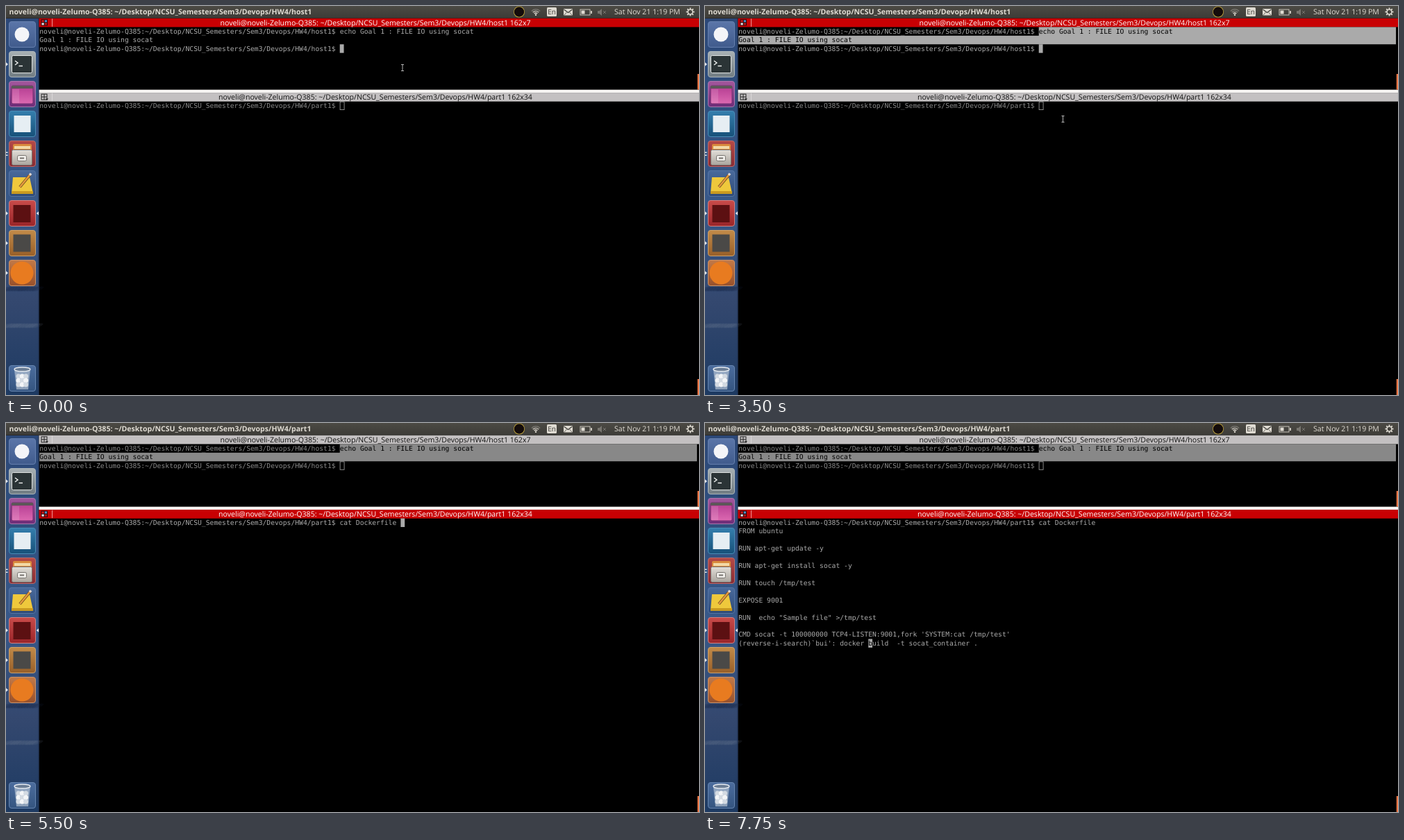
An HTML page with a canvas for the animation above (8 s loop, 998 px wide and 561 px high).

```html
<!DOCTYPE html>
<html lang="en">
<head>
<meta charset="utf-8">
<title>Terminal session</title>
<style>
html, body { margin: 0; width: 100%; height: 100%; overflow: hidden; background: #000; }
canvas { display: block; width: 998px; height: 561px; }
</style>
</head>
<body>
<canvas id="stage" width="998" height="561"></canvas>
<script>
const ctx = document.getElementById('stage').getContext('2d');
const LOOP = 8000, W = 998, H = 561;
const LEFT = 48.2, CW = 998 / 1366 * 8, RH = 998 / 1366 * 17;
const TOP1 = 30.4, TOP2 = 137.6;
const MONO = '9.71px "DejaVu Sans Mono", monospace';
const UI = '10.58px "Open Sans", sans-serif';
const USER = 'noveli@noveli-Zelumo-Q385:';
const DIR = '~/Desktop/NCSU_Semesters/Sem3/Devops/HW4/';
const PROMPT = dir => USER + DIR + dir + '$ ';
const COL = PROMPT('host1').length;

const DOCKERFILE = [
  'FROM ubuntu', '',
  'RUN apt-get update -y', '',
  'RUN apt-get install socat -y', '',
  'RUN touch /tmp/test', '',
  'EXPOSE 9001', '',
  'RUN  echo "Sample file" >/tmp/test', '',
  "CMD socat -t 100000000 TCP4-LISTEN:9001,fork 'SYSTEM:cat /tmp/test'"
];
const FOUND = 'docker build  -t socat_container .';

// Timelines: [start in ms, value]
const POINTER = [
  [0, [571, 89]], [250, [487.5, 69]], [500, [461.5, 52]], [750, [489.5, 41]],
  [1000, [484, 38.5]], [1750, [483, 46]], [2000, [483, 50]],
  [2750, [536, 196]], [3000, [536.5, 202]], [3250, [514.5, 162]],
  [3500, [515.5, 163]], [4250, null]
];
const BLINK = [[0, 1], [500, 0], [1000, 1], [1750, 0], [2250, 1], [2750, 0], [3500, 1], [6500, 0], [7000, 1]];
const SELECTED = [[0, 0], [1250, 1], [1750, 2]];
const TYPED = [[0, ''], [4250, 'c'], [4500, 'cat'], [4750, 'cat '], [5250, 'cat Do'], [5500, 'cat Dockerfile ']];
const QUERY = [[0, null], [7000, ''], [7500, 'bu'], [7750, 'bui']];

function at(line, t) {
  let value;
  for (const [start, v] of line) if (t >= start) value = v;
  return value;
}

function rect(x, y, w, h, fill) {
  ctx.fillStyle = fill;
  ctx.fillRect(x, y, w, h);
}

function frame(x, y, w, h, color, width = 1) {
  ctx.strokeStyle = color;
  ctx.lineWidth = width;
  ctx.strokeRect(x, y, w, h);
}

function round(x, y, w, h, r, fill, stroke) {
  ctx.beginPath();
  ctx.roundRect(x, y, w, h, r);
  ctx.fillStyle = fill;
  ctx.fill();
  if (stroke) {
    ctx.strokeStyle = stroke;
    ctx.lineWidth = 1;
    ctx.stroke();
  }
}

function disc(x, y, r, fill) {
  ctx.beginPath();
  ctx.arc(x, y, r, 0, Math.PI * 2);
  ctx.fillStyle = fill;
  ctx.fill();
}

function poly(points, fill) {
  ctx.beginPath();
  points.forEach(([x, y]) => ctx.lineTo(x, y));
  ctx.closePath();
  ctx.fillStyle = fill;
  ctx.fill();
}

function stroke(points, color, width = 1) {
  ctx.beginPath();
  points.forEach(([x, y]) => ctx.lineTo(x, y));
  ctx.strokeStyle = color;
  ctx.lineWidth = width;
  ctx.stroke();
}

function fade(y0, y1, ...colors) {
  const g = ctx.createLinearGradient(0, y0, 0, y1);
  colors.forEach((c, i) => g.addColorStop(i / (colors.length - 1), c));
  return g;
}

function label(str, x, y, color, font = UI, align = 'left') {
  ctx.font = font;
  ctx.textAlign = align;
  ctx.fillStyle = color;
  ctx.fillText(str, x, y);
}

const cellX = col => LEFT + col * CW;

function type(str, col, y, color) {
  label(str, cellX(col), y + 9.4, color, MONO);
}

function cursor(col, y, active, on) {
  if (!active) frame(cellX(col) + 0.4, y + 0.6, CW + 0.1, RH - 1, '#aaa', 0.8);
  else if (on) rect(cellX(col), y, CW, RH, '#aaa');
}

function drawPanel(t, dir) {
  rect(0, 0, W, 18, fade(0, 18, '#4c4a44', '#3c3b37'));
  rect(0, 17, W, 1, '#2a2926');
  label(USER + ' ' + DIR + dir, 4.5, 12.3, '#dfdbd2', 'bold 10.56px "Open Sans", sans-serif');

  disc(739, 8.5, 8, '#c5a83b');
  disc(739, 8.5, 7.2, '#140c0b');

  // Network strength
  const weak = t >= 3250 && t < 5000;
  [[8.2, '#77756f'], [5.6, weak ? '#88857f' : '#c4c0b8'], [3, '#dfdbd2']].forEach(([r, c]) => {
    ctx.beginPath();
    ctx.arc(763, 13, r, -Math.PI * 0.77, -Math.PI * 0.23);
    ctx.strokeStyle = c;
    ctx.lineWidth = 1.4;
    ctx.stroke();
  });
  disc(763, 12.7, 1.2, '#dfdbd2');

  round(779, 2, 14, 13, 1.5, '#dfdbd2');
  label('En', 786, 12.4, '#3c3b37', '10px "Open Sans", sans-serif', 'center');

  round(803, 4, 13, 9.5, 1, '#dfdbd2');
  stroke([[803.5, 5], [809.5, 9.5], [815.5, 5]], '#3c3b37', 1.1);
  stroke([[804, 13], [807.5, 9]], '#3c3b37', 0.7);
  stroke([[815, 13], [811.5, 9]], '#3c3b37', 0.7);

  frame(827, 5, 14, 8, '#c9c5bc');
  rect(842, 7, 2, 4, '#c9c5bc');
  rect(828.5, 6.5, 5, 5, '#dfdbd2');

  poly([[852, 7], [854.5, 7], [858, 4], [858, 14], [854.5, 11], [852, 11]], '#77756f');
  stroke([[860, 7], [864, 11]], '#77756f');
  stroke([[864, 7], [860, 11]], '#77756f');

  label('Sat Nov 21 1:19 PM', 876, 12.3, '#dfdbd2');

  for (let i = 0; i < 8; i++) {
    const a = i * Math.PI / 4, c = Math.cos(a), s = Math.sin(a);
    stroke([[985.5 + c * 3.6, 8.5 + s * 3.6], [985.5 + c * 6, 8.5 + s * 6]], '#dfdbd2', 1.8);
  }
  ctx.beginPath();
  ctx.arc(985.5, 8.5, 3.4, 0, Math.PI * 2);
  ctx.strokeStyle = '#dfdbd2';
  ctx.lineWidth = 1.5;
  ctx.stroke();
}

function tile(y, light, dark, edge) {
  round(4.5, y - 18.5, 38, 37, 3.5, fade(y - 19, y + 19, light, dark), edge);
}

function pip(y, right) {
  poly(right ? [[47, y - 2.7], [47, y + 2.7], [43.8, y]] : [[0, y - 2.7], [0, y + 2.7], [3, y]], '#e4e8ee');
}

function drawLauncher() {
  rect(0, 18, 47.5, H - 18, fade(18, H, '#2c4878', '#30507f', '#38598a', '#34486f', '#1d3a62'));
  // Soft cloudy wallpaper showing through
  for (let i = 0; i < 26; i++) {
    const x = (i * 37) % 48, y = 408 + (i * 53) % 106;
    ctx.beginPath();
    ctx.ellipse(x, y, 9, 2.5, -0.3, 0, Math.PI * 2);
    ctx.fillStyle = i % 2 ? 'rgba(105,120,150,.13)' : 'rgba(20,32,60,.16)';
    ctx.fill();
  }
  rect(46.5, 18, 1, H - 18, '#20304e');

  tile(41, '#5b76a9', '#405b8c', '#6680ae');
  disc(23, 41, 10.5, '#f4f5f8');

  tile(84, '#a9b1b4', '#717c82', '#aab4ba');
  round(8.5, 71.5, 29, 25, 2, '#2b3436', '#e0e3e2');
  stroke([[13, 79], [17, 82], [13, 85]], '#f2f4f3', 1.4);
  stroke([[18.5, 86.5], [24, 86.5]], '#f2f4f3', 1.4);

  tile(127, '#a4589d', '#6d2c78', '#a878ad');
  round(8, 115, 31, 26, 2, fade(115, 141, '#b43b91', '#dc69b1'), '#6f2b6c');
  rect(8, 115, 31, 4, '#5d5759');
  rect(9, 120, 10, 20, 'rgba(255,255,255,.13)');

  tile(170, '#357fae', '#175078', '#4b8db7');
  rect(11.5, 158, 24, 24, '#e6eef3');

  tile(213, '#b64a48', '#862a32', '#b96c6c');
  round(10, 199, 27, 12, 2, '#d98a3d');
  rect(12, 202, 23, 4, '#f2d9a6');
  round(8.5, 207.5, 29, 22, 2, fade(207, 230, '#e3e0da', '#a9a49d'), '#77716d');
  round(16.5, 215.5, 13, 8, 2, '#eeece8', '#77736e');
  rect(20, 218.5, 6, 2, '#77736e');

  tile(256, '#496a9c', '#2e4a77', '#5675a4');
  poly([[10, 247], [34, 247], [39, 270], [8, 270]], '#efc83c');
  rect(8, 267, 31, 4, '#c99a20');
  stroke([[20, 261], [35, 243]], '#6c4b24', 4);
  stroke([[20, 261], [34, 244]], '#e69a3d', 2.5);
  stroke([[34, 244], [36, 241.5]], '#ddd5d2', 3.5);

  tile(299, '#c94b4a', '#9a2529', '#d08080');
  rect(10.5, 287, 25, 25, '#5c1012');

  tile(342, '#c28b49', '#985f28', '#caa06c');
  rect(10.5, 329.5, 25, 25, '#4a4947');

  tile(385, '#c37a48', '#97502b', '#cb9268');
  disc(23, 385, 16.5, '#e87b20');

  tile(537, '#4c6d9e', '#34547f', '#6685af');
  poly([[12, 524], [35, 524], [32, 553], [15, 553]], 'rgba(212,221,230,.55)');
  ctx.beginPath();
  ctx.ellipse(23.5, 524, 11.5, 3, 0, 0, Math.PI * 2);
  ctx.fillStyle = '#6c7e95';
  ctx.fill();
  ctx.strokeStyle = '#e5eaf0';
  ctx.lineWidth = 1.4;
  ctx.stroke();
  for (let i = 0; i < 9; i++) {
    disc(18 + (i % 3) * 5.3, 534 + Math.floor(i / 3) * 6, 3.5, i % 2 ? '#f3f5f7' : '#d3dae2');
  }

  [84, 211, 215, 299, 342, 385].forEach(y => {
    if (y === 211 || y === 215) rect(0, y - 0.5, 2.6, 1.5, '#e4e8ee');
    else pip(y);
  });
  pip(299, true);
}

function drawTitle(y, text, active) {
  rect(47.5, y, W - 47.5, 12.6, active ? '#c80003' : '#c3c0c1');
  if (active) {
    rect(50.5, y + 1.5, 9.5, 9, '#25090b');
    rect(51.5, y + 2.5, 3.2, 3, '#d51a1c');
    rect(55.8, y + 2.5, 3.2, 3, '#4f8ec9');
    rect(51.5, y + 6.6, 3.2, 3, '#e8e8ee');
    rect(55.8, y + 6.6, 3.2, 3, '#bd1719');
  } else {
    frame(51, y + 2, 8, 8, '#222');
    stroke([[55, y + 2], [55, y + 10]], '#222');
    stroke([[51, y + 6], [59, y + 6]], '#222');
    poly([[57, y + 8.5], [61, y + 8.5], [59, y + 11]], '#222');
  }
  rect(66, y + 0.5, 1, 11.5, active ? '#e99' : '#d9d6d7');
  label(text, 532, y + 9.8, active ? '#fff' : '#111', UI, 'center');
}

function drawTop(t, active, on) {
  drawTitle(17.8, USER + ' ' + DIR + 'host1 162x7', active);
  const ink = active ? '#aaa' : '#888';
  const echo = 'echo Goal 1 : FILE IO using socat';
  const result = 'Goal 1 : FILE IO using socat';
  const sel = at(SELECTED, t);
  type(PROMPT('host1'), 0, TOP1, ink);
  if (sel === 2) {
    rect(cellX(COL), TOP1, CW * (162 - COL), RH + 0.2, ink);
    rect(LEFT, TOP1 + RH, CW * 162, RH, ink);
  } else if (sel === 1) {
    rect(cellX(COL), TOP1, CW, RH, ink);
  }
  type(echo, COL, TOP1, sel === 2 ? '#000' : ink);
  if (sel === 1) type('e', COL, TOP1, '#000');
  type(result, 0, TOP1 + RH, sel === 2 ? '#000' : ink);
  type(PROMPT('host1'), 0, TOP1 + RH * 2, ink);
  cursor(COL, TOP1 + RH * 2, active, on);
}

function drawBottom(t, active, on) {
  drawTitle(125.1, USER + ' ' + DIR + 'part1 162x34', active);
  const ink = active ? '#aaa' : '#888';
  const typed = at(TYPED, t), query = at(QUERY, t);
  type(PROMPT('part1') + typed, 0, TOP2, ink);
  if (t < 6000) {
    cursor(COL + typed.length, TOP2, active, on);
    return;
  }
  DOCKERFILE.forEach((line, i) => type(line, 0, TOP2 + RH * (i + 1), ink));
  const y = TOP2 + RH * (DOCKERFILE.length + 1);
  if (query === null) {
    type(PROMPT('part1'), 0, y, ink);
    cursor(COL, y, active, on);
    return;
  }
  const head = '(reverse-i-search)`' + query + "': ";
  const hit = query ? FOUND.indexOf(query) : 0;
  type(head + (query ? FOUND : ''), 0, y, ink);
  cursor(head.length + hit, y, active, on);
  if (query) type(FOUND[hit], head.length + hit, y, '#000');
}

function drawPointer([x, y]) {
  [['#000', 2.2], ['#c8c8c8', 0.9]].forEach(([color, width]) => {
    stroke([[x, y - 4.5], [x, y + 4.5]], color, width);
    stroke([[x - 2, y - 4.5], [x + 2, y - 4.5]], color, width);
    stroke([[x - 2, y + 4.5], [x + 2, y + 4.5]], color, width);
  });
}

function draw(t) {
  const lower = t >= 3750, on = at(BLINK, t);
  ctx.textRendering = 'geometricPrecision';
  rect(0, 0, W, H, '#000');
  drawPanel(t, lower ? 'part1' : 'host1');
  drawLauncher();
  rect(47.5, 120.7, W - 47.5, 4.5, '#f6f4f2');
  drawTop(t, !lower, on);
  drawBottom(t, lower, on);
  rect(995.8, 98, 2.2, 22.7, '#f07746');
  rect(995.8, 538, 2.2, 23, '#f07746');
  const p = at(POINTER, t);
  if (p) drawPointer(p);
}

const start = performance.now();
function tick() {
  draw((performance.now() - start) % LOOP);
  requestAnimationFrame(tick);
}
tick();
</script>
</body>
</html>
```
